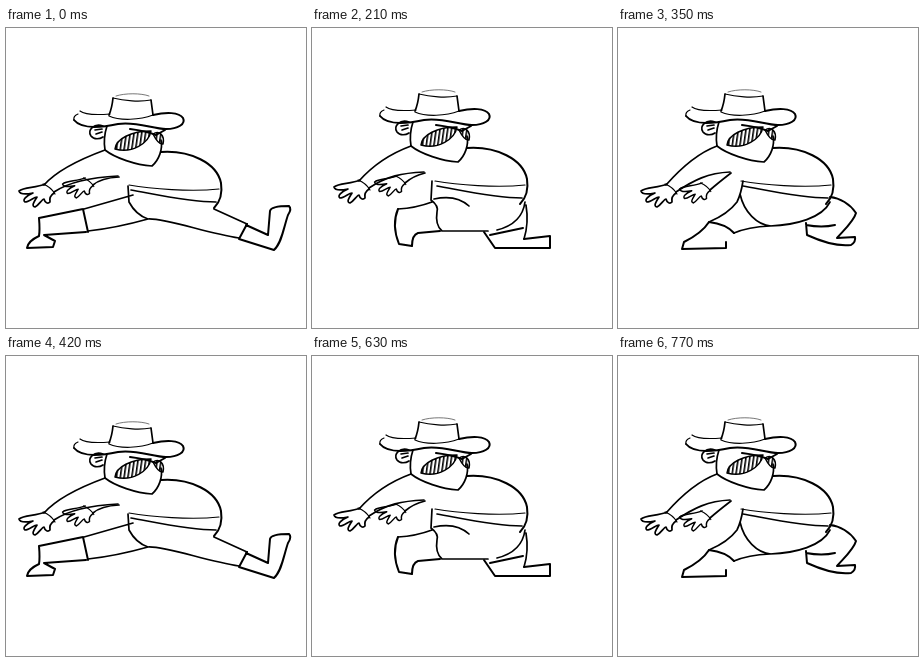
Animation, 300 px wide and 300 px high, one loop 0.84 s. Source, as an HTML page:

```html
<!DOCTYPE html>
<html lang="en">
<head>
<meta charset="utf-8">
<title>Running cowboy</title>
<style>
  html, body { margin: 0; width: 100%; height: 100%; overflow: hidden; background: #fff; }
  svg { display: block; width: 100%; height: 100%; }
  path { fill: none; stroke: #000; stroke-width: 1.7; stroke-linecap: round; stroke-linejoin: round; }
  .thin { stroke-width: 1.2; }
  .faint { stroke-width: .8; stroke: #555; }
  .bold { stroke-width: 2; }
  .hatched { fill: url(#hatch); stroke-width: 1.5; }
</style>
</head>
<body>
<svg viewBox="0 0 300 300">
  <defs>
    <pattern id="hatch" width="3.8" height="20" patternUnits="userSpaceOnUse" patternTransform="rotate(8)">
      <rect width="1.6" height="20"/>
    </pattern>
    <g id="hand">
      <path d="M-9-7C-18-3-30-4-35 0C-34 4-26 3-21 2C-28 5-32 9-29 11C-25 11-20 6-17 6C-20 11-23 15-19 16C-15 14-12 8-10 8C-9 12-6 13-4 11C-5 6-3 4 0 2"/>
      <path class="thin" d="M-11-7Q-3-4 1 3"/>
    </g>
  </defs>

  <g id="upper">
    <!-- hat -->
    <path class="faint" d="M110 68C119 65 135 65 143 68"/>
    <path class="thin" d="M107 70C118 73 134 74 145 72"/>
    <path d="M107 70Q106 80 103 87M145 72L147 87"/>
    <path class="thin" d="M103 88C114 93 134 92 147 87"/>
    <path class="thin" d="M74 83C79 87 91 87 104 86M72 86Q67 88 68 92"/>
    <path class="bold" d="M68 92C76 102 98 99 112 96C130 93 147 101 160 101C172 101 180 96 177 90C173 84 160 84 147 87"/>
    <!-- head -->
    <path d="M97 98C88 95 81 102 85 108C88 112 94 111 97 109M89 102L96 101M90 106L96 104"/>
    <path d="M101 98Q97 110 99 122C109 130 130 137 146 138C153 132 157 121 155 112"/>
    <path class="bold" d="M124 101Q140 103 150 107L159 102"/>
    <path class="hatched" d="M109 121C110 111 125 103 145 103C143 115 126 126 109 121Z"/>
    <path class="hatched" d="M147 106C153 102 159 107 157 116C153 117 150 112 147 106Z"/>
    <!-- torso -->
    <path class="bold" d="M155 124C184 122 211 135 215 155C217 168 213 175 208 180"/>
    <path class="thin" d="M123 157C145 161 185 164 213 161"/>
    <path d="M125 162C148 166 182 174 210 174"/>
  </g>
  <path id="nearArm"/>
  <path id="farArm"/>
  <use id="nearHand" href="#hand"/>
  <use id="farHand" href="#hand"/>
  <path id="legs" class="bold"/>
  <path id="folds"/>
</svg>

<script>
const STEP = 70;

// One half of the run cycle: bob, wrists [x, y], leg outlines and finer fold lines.
const poses = [
  { // full stride
    bob: 0, near: [48, 163], far: [87, 156], tilt: 0,
    legs: `M77 181L33 190Q34 202 33 208Q22 213 21 220L47 219L49 213L38 207M38 207L80 204M77 181L82 204
      M240 197L262 207L264 183Q265 178 283 178Q286 181 282 187C278 198 276 215 268 222L233 211L241 196`,
    folds: `M78 181L127 167M82 203Q110 200 142 191C160 190 200 205 233 210
      M122 158L123 174Q130 187 142 191M208 181L241 196`
  },
  { // front foot reaching the ground
    bob: 0, near: [53, 159], far: [87, 155], tilt: 0,
    legs: `M78 182L49 188Q36 184 33 189Q35 203 27 210L27 221L47 219L48 207L84 204M78 181L84 204
      M240 194L254 207L278 207L279 220L248 219L225 206L240 194`,
    folds: `M79 181L122 167M84 204Q115 200 150 191M122 157L123 168Q132 185 152 191
      C178 191 208 190 214 175M204 184L239 195M186 200L225 207`
  },
  { // weight on the front foot
    bob: -3, near: [55, 160], far: [92, 156], tilt: -8,
    legs: `M79 181L44 187Q42 201 31 212L32 216L41 218L51 210L83 200M80 181L84 201
      M228 197C216 203 206 206 197 205M228 197L230 207L255 209L255 219L225 221L197 205`,
    folds: `M80 181L121 174M83 201L145 192M121 154L121 172Q130 186 146 189
      C164 190 182 201 198 204M213 179L228 197`
  },
  { // front knee bent
    bob: -4, near: [57, 159], far: [93, 154], tilt: 0,
    legs: `M86 181C81 193 83 206 87 216L100 218Q100 207 106 205L128 203
      M172 204L183 220L238 220L238 208L212 211M178 207L211 200`,
    folds: `M86 181Q104 180 120 174M120 153L119 172Q127 178 125 184Q123 197 130 203L176 203
      M122 171Q144 166 157 178M213 174C211 189 201 198 185 202M214 177Q217 195 212 211`
  },
  { // passing
    bob: -8, near: [61, 167], far: [94, 164], tilt: -4,
    legs: `M123 148L122 205L121 220L178 220Q177 215 165 209M122 205Q142 210 160 210
      M216 167Q221 179 213 184C198 188 180 202 160 215`,
    folds: `M215 156Q209 173 187 192L165 212`
  },
  { // rear leg pushing off
    bob: -4, near: [58, 163], far: [92, 161], tilt: 0,
    legs: `M91 194Q84 205 66 214L64 221L108 220L108 214M91 194Q108 196 116 205
      M212 169C222 170 232 176 238 185C236 193 226 202 219 210L237 209Q238 214 233 217
      C218 219 200 212 189 207L188 195M188 197Q204 200 217 197`,
    folds: `M125 153Q123 166 119 174Q110 186 91 194M116 205Q130 199 152 198C178 197 204 190 212 174
      M122 166C126 184 139 197 153 198`
  }
];

const part = id => document.getElementById(id);
const draw = (id, d) => part(id).setAttribute('d', d);
const place = (id, transform) => part(id).setAttribute('transform', transform);

function show({ bob, near: [nx, ny], far: [fx, fy], tilt, legs, folds }) {
  place('upper', `translate(0 ${bob})`);
  place('nearHand', `translate(${nx} ${ny}) rotate(${tilt})`);
  place('farHand', `translate(${fx} ${fy}) rotate(${tilt}) scale(.87)`);
  draw('nearArm', `M99 ${122 + bob}C80 ${129 + bob} ${nx + 5} ${ny - 23} ${nx - 10} ${ny - 6}
    M${nx} ${ny + 1}C${nx + 18} ${ny - 11} 90 ${149 + bob} 112 ${148 + bob}`);
  draw('farArm', `M${fx} ${fy + 1}Q${fx + 8} ${fy - 6} 113 ${149 + bob}`);
  draw('legs', legs);
  draw('folds', folds);
}

function frame() {
  show(poses[Math.floor(performance.now() / STEP) % poses.length]);
  requestAnimationFrame(frame);
}
frame();
</script>
</body>
</html>
```
